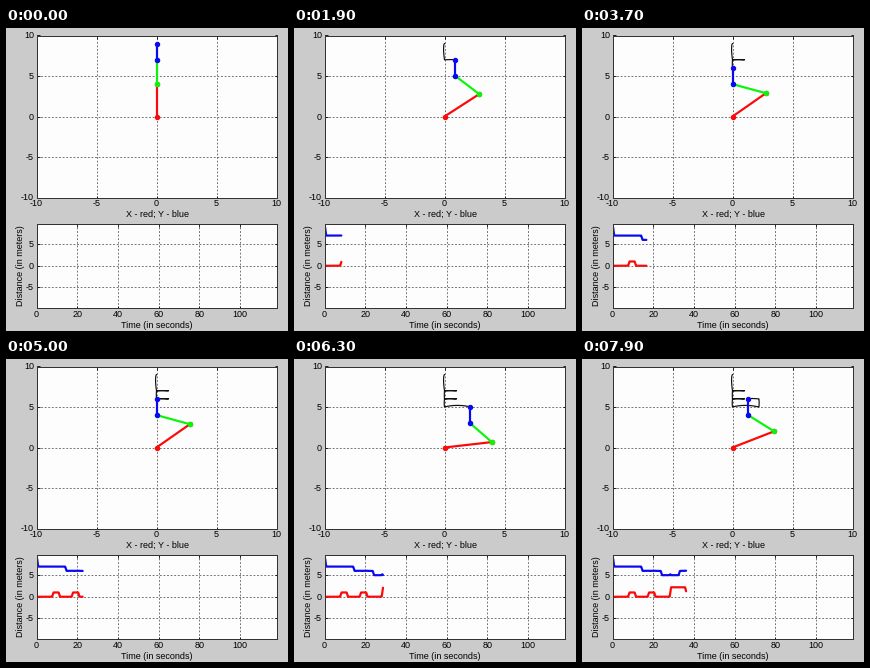
Write a matplotlib script that moves like this. It is 282 px wide and 303 px high and loops after 8 s.

```python
import numpy as np
import matplotlib.pyplot as plt
from matplotlib.animation import FuncAnimation

W, H, DPI = 282, 303, 64
FRAMES, STEP = 80, 100
L1, L2, L3 = 4, 3, 2             # link lengths
MOVE, GAP, REST = 0.85, 3.2, 4.4  # seconds per move, between moves, at the base
RED, GREEN, BLUE = "#fa0a0a", "#0af50a", "#0a0af0"


def px(v):
    return v * 72 / DPI


def plan():
    """Start time and tip position of every move: a comb, then a box beside it."""
    yield 0, 0, 7
    t = 7.6
    for row in (7, 6):
        for x, y in ((1, row), (0, row), (0, row - 1)):
            yield t, x, y
            t += GAP
    t += REST - GAP
    yield t, 2.2, 5
    yield t + REST, 2.2, 6
    yield t + REST + GAP, 1, 6


def solve(x, y):
    """Shoulder and elbow angles that hold the last link upright at (x, y)."""
    w = y - L3
    d = np.hypot(x, w)
    a = np.arctan2(w, x) - np.arccos((L1**2 + d**2 - L2**2) / (2 * L1 * d))
    b = np.arctan2(w - L1 * np.sin(a), x - L1 * np.cos(a))
    return np.array([a, b])


def angles(t):
    cur = np.full(2, np.pi / 2)
    out = cur[:, None] + np.zeros_like(t)
    for start, x, y in plan():
        u = np.clip((t - start) / MOVE, 0, 1)
        goal = solve(x, y)
        out = out + (goal - cur)[:, None] * (u * u * (3 - 2 * u))
        cur = goal
    return out


def joints(t):
    a, b = angles(t)
    ex, ey = L1 * np.cos(a), L1 * np.sin(a)
    wx, wy = ex + L2 * np.cos(b), ey + L2 * np.sin(b)
    return (0 * ex, 0 * ex), (ex, ey), (wx, wy), (wx, wy + L3)


def clock(frame):
    return max(0, 4.65 * frame * STEP / 1000 - 0.55)


plt.rcParams["font.family"] = "Liberation Sans"
fig = plt.figure(figsize=(W / DPI, H / DPI), dpi=DPI, facecolor="#cbcbcb")


def text(x, y, s, ha="center", **kw):
    fig.text(x / W, 1 - y / H, s, ha=ha, fontsize=px(9), color="black", **kw)


def make_axes(left, top, w, h, xlim, ylim, xticks, yticks):
    ax = fig.add_axes([left / W, 1 - (top + h) / H, w / W, h / H])
    ax.set(xlim=xlim, ylim=ylim, xticks=xticks, yticks=yticks,
           facecolor="#fefdfe")
    ax.tick_params(direction="in", length=px(2.5), width=px(0.8), top=True,
                   right=True, labelbottom=False, labelleft=False)
    for s in ax.spines.values():
        s.set(linewidth=px(1), color="#333333")
    ax.set_axisbelow(True)
    ax.grid(True, color="#666666", linewidth=px(0.9), linestyle=(0, (2, 2)))
    for v in xticks:
        x = left + w * (v - xlim[0]) / (xlim[1] - xlim[0])
        text(x, top + h + 9, str(v))
    for v in yticks:
        y = top + h * (ylim[1] - v) / (ylim[1] - ylim[0])
        text(left - 2.5, y + 3, str(v), ha="right")
    return ax


fives = range(-10, 11, 5)
arm_ax = make_axes(30.5, 7.5, 240, 162, (-10, 10), (-10, 10), fives, fives)
time_ax = make_axes(30.5, 195.5, 240, 84.5, (0, 118), (-9.8, 9.8),
                    range(0, 101, 20), range(-5, 6, 5))
text(151, 189, "X - red; Y - blue")
text(151, 300.5, "Time (in seconds)")
text(15, 238, "Distance (in meters)", rotation=90, va="center")

path, = arm_ax.plot([], [], color="#111111", lw=px(1.2))
links = [arm_ax.plot([], [], "o-", color=c, lw=px(2.2), ms=px(4),
                     mew=px(1.4))[0] for c in (RED, GREEN, BLUE)]
traces = [time_ax.plot([], [], color=c, lw=px(2.2),
                       solid_capstyle="round")[0] for c in (RED, BLUE)]


def draw(frame):
    now = clock(frame)
    t = np.append(np.arange(-0.1, now, 0.05), now)
    pts = joints(t)
    tip = pts[-1]
    path.set_data(*tip)
    for link, p, q in zip(links, pts, pts[1:]):
        link.set_data([p[0][-1], q[0][-1]], [p[1][-1], q[1][-1]])
    for trace, values in zip(traces, tip):
        trace.set_data(t, values)
    return [path, *links, *traces]


anim = FuncAnimation(fig, draw, frames=FRAMES, interval=STEP,
                     repeat=True, repeat_delay=0, blit=False)
plt.show()
```
